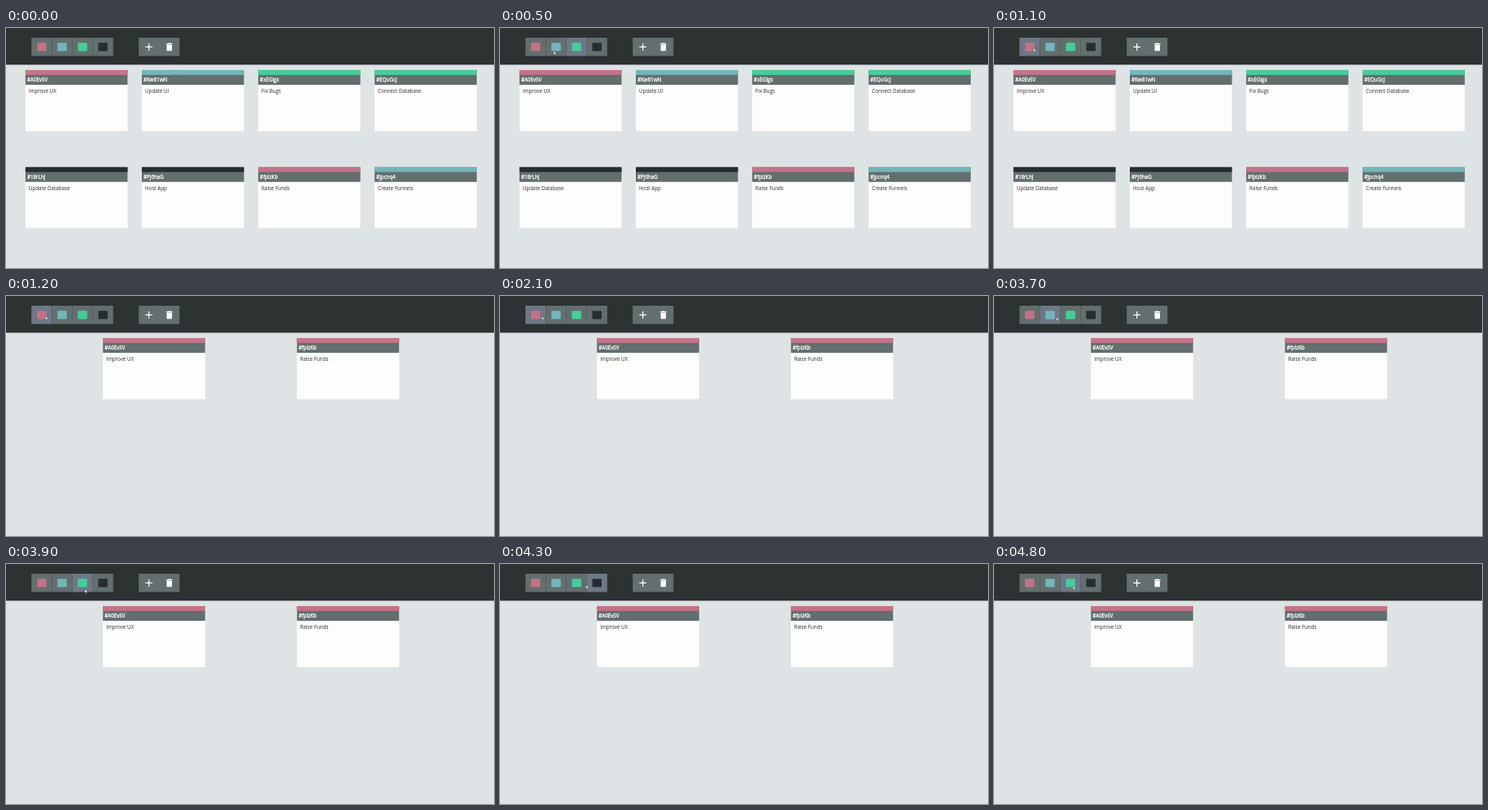
Animation, 600 px wide and 296 px high, one loop 5000 ms. Source, as an HTML page:

```html
<!DOCTYPE html>
<html lang="en">
<head>
<meta charset="utf-8">
<title>Task board</title>
<style>
  html, body { margin: 0; width: 100%; height: 100%; overflow: hidden; background: #dee4e5; }
  svg { display: block; width: 100vw; height: 100vh; }
  text { font-family: "Open Sans", sans-serif; font-size: 6.25px; fill: #2a2c2c; }
  .id { fill: #fff; stroke: #fff; stroke-width: .28px; }
</style>
</head>
<body>
<svg id="stage" viewBox="0 0 600 296"></svg>
<script>
const LOOP = 5000, STEP = 100, FILTER_AT = 1200;
const PINK = '#c47288', BLUE = '#73b5ba', GREEN = '#45cd9a', DARK = '#272d2e';
const BAR = '#636e6e', HOVER = '#6e7887';
const COLORS = [PINK, BLUE, GREEN, DARK];
const CARDS = [
  ['#A0EvSV', 'Improve UX', PINK],
  ['#Kw81wN', 'Update UI', BLUE],
  ['#xEGlgx', 'Fix Bugs', GREEN],
  ['#EQuGcJ', 'Connect Database', GREEN],
  ['#18rLhJ', 'Update Database', DARK],
  ['#Pj6haG', 'Host App', DARK],
  ['#fplzKb', 'Raise Funds', PINK],
  ['#jpcnq4', 'Create Funnels', BLUE]
];
// Pointer keys: time, x, y
const PATH = [
  [0, 207.7, 52], [100, 196, 49], [600, 51, 26], [700, 50, 25.2], [900, 48.6, 24.8],
  [2000, 48.6, 24.8], [2500, 75, 25.7], [3600, 75, 25.7], [3700, 76.6, 26],
  [3900, 97, 31], [4100, 124, 33.5], [4200, 117, 30], [4300, 105.6, 26],
  [4400, 103.5, 26.5], [4600, 103.5, 26.5], [4800, 97.2, 27], [5000, 97.2, 27]
];
const LEFT = 31.3, CELL = 25.12, TOP = 12, HEIGHT = 22.5;

const stage = document.getElementById('stage');

function add(parent, tag, attrs, text) {
  const el = document.createElementNS('http://www.w3.org/2000/svg', tag);
  for (const k in attrs) el.setAttribute(k, attrs[k]);
  if (text) el.textContent = text;
  parent.appendChild(el);
  return el;
}
const rect = (parent, x, y, width, height, fill, rx = 0) =>
  add(parent, 'rect', { x, y, width, height, fill, rx });

function icon(x, y, scale, d) {
  add(stage, 'path', { d, fill: '#fff', transform: `translate(${x} ${y}) scale(${scale}) translate(-12 -12)` });
}

function card([id, label, color]) {
  const g = add(stage, 'g', {});
  rect(g, 0, 0, 125.6, 75.3, '#fdfdfb');
  rect(g, 0, 0, 125.6, 18.2, BAR);
  rect(g, 0, 0, 125.6, 6, color);
  add(g, 'text', { x: 2, y: 14.6, class: 'id' }, id);
  add(g, 'text', { x: 4, y: 28.3 }, label);
  return { g, color };
}

rect(stage, 0, 0, 600, 296, '#dee4e5');
rect(stage, 0, 45, 600, 1.5, '#dcdfe6');
rect(stage, 0, 0, 600, 45.3, '#2d3233');
const cells = COLORS.map((c, i) => {
  const x = LEFT + i * CELL, cell = rect(stage, x, TOP, CELL, HEIGHT, BAR);
  rect(stage, x + 6.8, 18.3, 11.5, 10.2, c, 1.3);
  return cell;
});
rect(stage, 163.2, TOP, 50.1, HEIGHT, BAR);
icon(175.7, 23.4, .62, 'M19 13h-6v6h-2v-6H5v-2h6V5h2v6h6v2z');
icon(200.8, 23.4, .54, 'M6 19c0 1.1.9 2 2 2h8c1.1 0 2-.9 2-2V7H6v12zM19 4h-3.5l-1-1h-5l-1 1H5v2h14V4z');
const cards = CARDS.map(card);
const pointer = add(stage, 'path', {
  d: 'M0 0V4.6L1.1 3.7 1.9 5.4 2.7 5 2 3.4 3.4 3.3Z',
  fill: '#fff', stroke: '#24292a', 'stroke-width': .4
});

function pointAt(t) {
  const i = PATH.findIndex(k => k[0] > t);
  const [t0, x0, y0] = PATH[i - 1], [t1, x1, y1] = PATH[i];
  let p = (t - t0) / (t1 - t0);
  if (t1 - t0 >= 500) p = p * p * (3 - 2 * p);
  return [x0 + (x1 - x0) * p, y0 + (y1 - y0) * p];
}

function place(filtered) {
  let n = 0;
  cards.forEach(({ g, color }, i) => {
    const shown = !filtered || color === PINK;
    g.style.display = shown ? '' : 'none';
    if (!shown) return;
    const x = filtered ? 119.2 + 238.5 * n++ : 23.9 + 143.1 * (i % 4);
    const y = filtered || i < 4 ? 51.9 : 171.6;
    g.setAttribute('transform', `translate(${x} ${y})`);
  });
}

function draw(time) {
  const t = Math.floor((time % LOOP) / STEP) * STEP;
  const [x, y] = pointAt(t);
  // The highlight trails the pointer by one step
  const [hx, hy] = pointAt(Math.max(0, t - STEP));
  const over = hy >= TOP && hy <= TOP + HEIGHT ? Math.floor((hx - LEFT) / CELL) : -1;
  cells.forEach((c, i) => c.setAttribute('fill', i === over ? HOVER : BAR));
  pointer.setAttribute('transform', `translate(${x} ${y})`);
  place(t >= FILTER_AT);
}

const start = performance.now();
function tick() {
  draw(performance.now() - start);
  requestAnimationFrame(tick);
}
tick();
</script>
</body>
</html>
```
